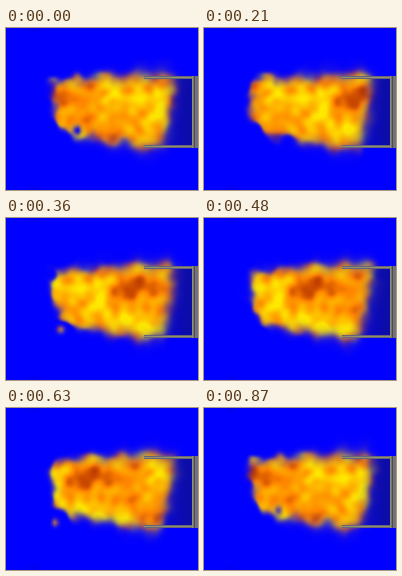
A matplotlib script for the animation above (900 ms loop, 192 by 162 pixels).

```python
import numpy as np
import matplotlib.pyplot as plt
from matplotlib.animation import FuncAnimation
from matplotlib.patches import Rectangle

W, H, DPI = 192, 162, 100
FRAMES, INTERVAL = 30, 30
SPEED, PERIOD = 5, 150      # the gas drifts left and wraps once per loop

rng = np.random.default_rng(11)
X, Y = np.meshgrid(np.arange(W) + 0.0, np.arange(H) + 0.0)
U, V = np.meshgrid(np.arange(PERIOD) + 0.0, np.arange(H) + 0.0)


def noise(sigma):
    """Smooth unit noise that tiles in both directions."""
    fy = np.fft.fftfreq(H)[:, None]
    fx = np.fft.fftfreq(PERIOD)[None, :]
    blur = np.exp(-2 * (np.pi * sigma) ** 2 * (fx ** 2 + fy ** 2))
    n = np.fft.ifft2(np.fft.fft2(rng.normal(size=(H, PERIOD))) * blur).real
    return (n - n.mean()) / n.std()


def blob(u, y, r):
    du = (U - u + PERIOD / 2) % PERIOD - PERIOD / 2
    return np.exp(-(du ** 2 + (V - y) ** 2) / r ** 2)


def sigmoid(v):
    return 1 / (1 + np.exp(-np.clip(v, -40, 40)))


def ramp(v, lo, hi):
    return np.clip((v - lo) / (hi - lo), 0, 1)


def mix(a, b, t):
    return a + (b - a) * t[..., None]


# Dark clusters and bright pockets carried by the drifting gas
heat_map = 0.36 + 0.11 * noise(4)
for u, y, r, s in [(177, 73, 12, .4), (211, 71, 10, .45), (110, 95, 15, .12),
                   (147, 84, 22, -.14), (175, 101, 10, -.15),
                   (205, 102, 9, -.15)]:
    heat_map += s * blob(u, y, r)
edge_map = noise(4)
hole_map = blob(71, 102, 5)
ember_map = blob(114, 111, 4) + blob(153, 114, 4)

YELLOW, ORANGE, RED = (np.array(c, float) for c in
                       [(255, 232, 0), (255, 132, 0), (140, 4, 0)])


def backdrop():
    img = np.zeros((H, W, 3))
    img[..., 2] = 255
    img[:4, 22:33, 2] = img[157:, 22:33, 2] = 244
    inside = (X < 187) & (Y > 49) & (Y < 118)
    return mix(img, np.array([12, 12, 170.0]), ramp(X, 140, 180) * inside)


BACK = backdrop()


def plume_alpha(n, cols):
    swirl = 2 * np.pi * (X + SPEED * n - 130) / 30
    flicker = 2 * np.pi * (Y / 32 + 4 * n / FRAMES)
    grow = ramp(X, 50, 140)

    left = 46 + (Y - 68) ** 2 / 110 + 1.5 * np.sin(flicker)
    top = 52 - 6 * grow - 2 * np.cos(swirl)
    bottom = 104 + 17 * grow - 3 * ramp(X, 142, 160) + 1.8 * np.sin(swirl + 1)
    right = 167 - 11 * ramp(Y, 65, 120)

    rough = edge_map[:, cols] * (1.8 - grow)
    soft = 1.7 + 1.5 * grow
    alpha = sigmoid((Y - top + rough) / soft)
    alpha *= sigmoid((bottom - Y + rough) / soft)
    alpha *= sigmoid((X - left + rough) / 1.8)
    alpha *= sigmoid((right - X + rough) / 2.8)
    alpha *= 1 - .9 * hole_map[:, cols] * ramp(X, 80, 72)
    ember = .6 * ember_map[:, cols] * ramp(X, 42, 48) * ramp(X, 70, 62)
    return np.maximum(alpha, ember)


def plume(n):
    cols = (np.arange(W) + SPEED * n) % PERIOD
    heat = heat_map[:, cols]
    warm = mix(YELLOW, ORANGE, ramp(heat, .1, .5))
    rgb = mix(warm, RED, ramp(heat, .5, .95))
    img = mix(BACK, rgb, plume_alpha(n, cols))
    return np.clip(img, 0, 255).astype(np.uint8)


fig = plt.figure(figsize=(W / DPI, H / DPI), dpi=DPI)
ax = fig.add_axes([0, 0, 1, 1])
ax.axis("off")
picture = ax.imshow(plume(0), extent=(0, W, H, 0), interpolation="nearest",
                    aspect="auto")
ax.set_xlim(0, W)
ax.set_ylim(H, 0)


def bar(x, y, w, h, color):
    ax.add_patch(Rectangle((x, y), w, h, fc=color, lw=0, zorder=3))


# Nozzle: two walls and the double end plate
for y in (48, 117):
    bar(138, y, 50, 3, "#666678")
    bar(138, y + 1, 50, 1, "#948f6c")
bar(186, 48, 6, 72, "#747478")
bar(188, 48, 1, 72, "#4c4c58")
bar(186, 48, 1, 72, "#948f6c")


def update(n):
    picture.set_data(plume(n))
    return (picture,)


anim = FuncAnimation(fig, update, frames=FRAMES, interval=INTERVAL,
                     repeat=True, repeat_delay=0, blit=False)
plt.show()
```
